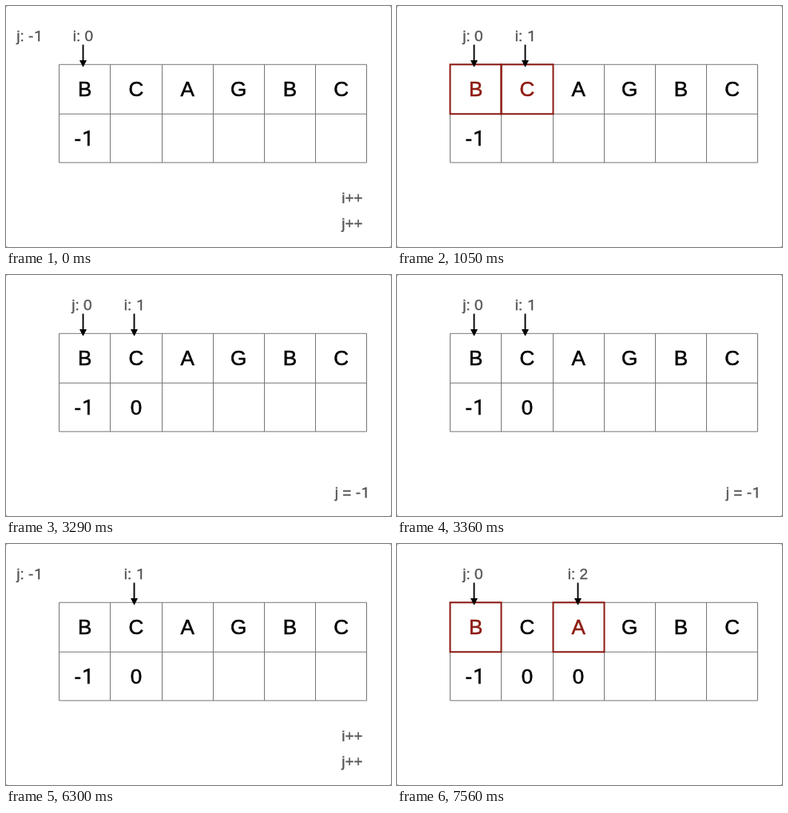
Write an HTML page that moves like this. It is 482 px wide and 302 px high and loops after 8000 ms.

```html
<!DOCTYPE html>
<html lang="en">
<head>
<meta charset="utf-8">
<title>Prefix table</title>
<style>
  html, body { margin: 0; width: 100%; height: 100%; overflow: hidden; background: #aaa; }
  svg { display: block; width: 482px; height: 302px; }
  text { font-family: "Liberation Sans", Arial, sans-serif; white-space: pre; }
  .one { font-family: Roboto, sans-serif; }
  .cell { font-size: 26px; text-anchor: middle; fill: #000; stroke: #000; stroke-width: .5; }
  .label { font-size: 19px; fill: #555; stroke: #555; stroke-width: .35; }
  .grid { fill: none; stroke: #777; stroke-width: 1; }
  .box { fill: none; stroke: #8c1a11; stroke-width: 2; }
  .cell.hit { fill: #8c1a11; stroke: #8c1a11; }
</style>
</head>
<body>
<svg id="stage" viewBox="0 0 482 302"></svg>
<script>
const LOOP = 8000;
const LETTERS = [..."BCAGBC"];
const LEFT = 66.7, CELL = 64.15, TOP = 73.3, MID = 135.3, BOTTOM = 196.2;
const ARROW_X = [96.5, 160.5, 226.5];
const LABEL_X = { i: [83.8, 147.8, 213.8], j: [82.3] };

// Each step holds until the next one begins.
const STEPS = [
  { at: 0,    i: 0, j: -1, values: [-1],       note: ["i++", "j++"] },
  { at: 980,  i: 1, j: 0,  values: [-1],       hits: [0, 1] },
  { at: 2310, i: 1, j: 0,  values: [-1, 0],    hits: [0, 1] },
  { at: 3290, i: 1, j: 0,  values: [-1, 0],    note: ["j = -1"] },
  { at: 4270, i: 1, j: -1, values: [-1, 0] },
  { at: 5250, i: 1, j: -1, values: [-1, 0],    note: ["i++", "j++"] },
  { at: 6370, i: 2, j: 0,  values: [-1, 0],    hits: [0, 2] },
  { at: 7560, i: 2, j: 0,  values: [-1, 0, 0], hits: [0, 2] }
];

// Vertical lines sit on whole pixels.
const edge = n => Math.floor(LEFT + n * CELL) + 0.5;
const center = n => LEFT + (n + 0.5) * CELL;

// A footless "1" suits the lettering better.
const text = (x, y, cls, value) =>
  `<text x="${x}" y="${y}" class="${cls}">${String(value).replace("1", '<tspan class="one" dx=".04em">1</tspan>')}</text>`;

const arrow = x =>
  `<path d="M${x} 48.5V70" stroke="#000" stroke-width="1.9"/><path d="M${x - 4.5} 68h9l-4.5 8.8z"/>`;

function pointer(name, index) {
  if (index < 0) return text(13.3, 44, "label", `${name}: ${index}`);
  return text(LABEL_X[name][index], 44, "label", `${name}: ${index}`) + arrow(ARROW_X[index]);
}

function grid() {
  let d = [TOP, MID, BOTTOM].map(y => `M${edge(0)} ${y}H${edge(6)}`).join("");
  for (let n = 0; n <= 6; n++) d += `M${edge(n)} ${TOP}V${BOTTOM}`;
  return `<path class="grid" d="${d}"/>`;
}

function notes(lines) {
  const first = 279 - 32 * (lines.length - 1);
  const x = lines.length > 1 ? 420.3 : 411.8;
  return lines.map((line, n) => text(x, first + 32 * n, "label", line)).join("");
}

function picture({ i, j, values, hits = [], note = [] }) {
  return '<rect width="482" height="302" rx="3" fill="#fff"/>' + grid() +
    LETTERS.map((c, n) => text(center(n), 113.3, hits.includes(n) ? "cell hit" : "cell", c)).join("") +
    values.map((v, n) => text(center(n) - (v < 0 ? 1 : 0), 174.7, "cell", v)).join("") +
    hits.map(n => `<rect class="box" x="${edge(n)}" y="${TOP}" width="${edge(n + 1) - edge(n)}" height="${MID - TOP}"/>`).join("") +
    pointer("j", j) + pointer("i", i) + notes(note);
}

const stage = document.getElementById("stage");
const start = performance.now();
let shown = null;

function draw() {
  const time = (performance.now() - start) % LOOP;
  const step = STEPS.findLast(s => s.at <= time) || STEPS[0];
  if (step !== shown) {
    stage.innerHTML = picture(step);
    shown = step;
  }
  requestAnimationFrame(draw);
}
draw();
</script>
</body>
</html>
```
